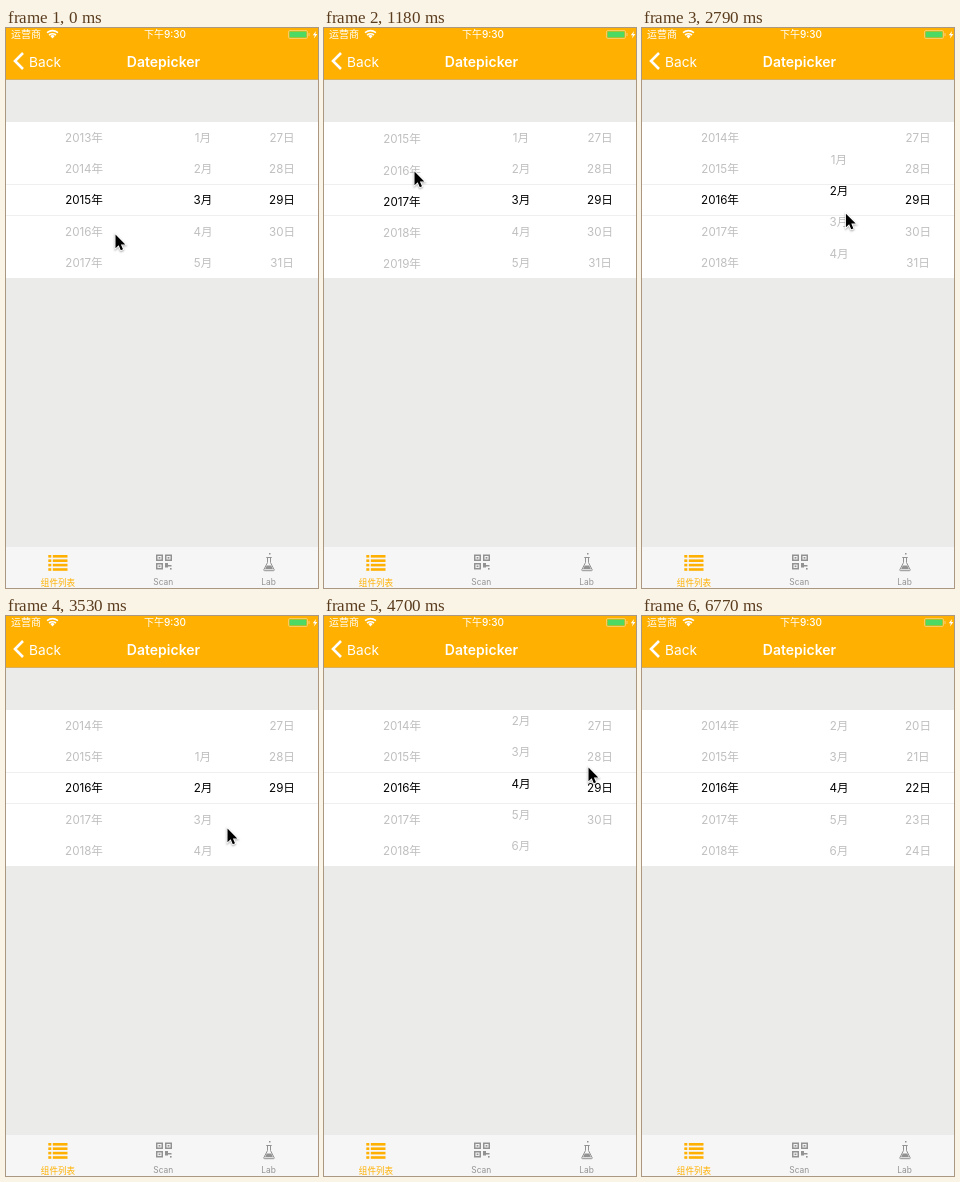
An HTML page with a canvas for the animation above (7.47 s loop, 312 by 560 pixels).

```html
<!DOCTYPE html>
<html lang="zh">
<head>
<meta charset="utf-8">
<title>Datepicker</title>
<style>
  html, body { margin: 0; width: 100%; height: 100%; overflow: hidden; background: #ebebea; }
  canvas { display: block; width: 312px; height: 560px; }
</style>
</head>
<body>
<canvas id="stage"></canvas>
<script>
const LOOP = 7470, STEP = 147.1, LAST_STEP = 46;
const ROW = 31.2, MIDDLE = 172;
const AMBER = '#ffb000', GRAY = '#929292';
const FONT = 'Inter, "Noto Sans CJK SC", "Noto Sans CJK", sans-serif';

const canvas = document.getElementById('stage');
const ctx = canvas.getContext('2d');
const ratio = window.devicePixelRatio || 1;
canvas.width = 312 * ratio;
canvas.height = 560 * ratio;
ctx.scale(ratio, ratio);

const glide = p => p * p * (3 - 2 * p);
// Runs a little past the goal, then springs back, like a flicked wheel.
const flick = p => 1 + 2.7 * (p - 1) ** 3 + 1.7 * (p - 1) ** 2;

// Plays moves of the form { from, to, goal } one after another and rests between them.
function play(start, moves, ease, step) {
  return moves.reduce((value, { from, to, goal }) => {
    const part = ease(Math.min(1, Math.max(0, (step - from) / (to - from))));
    return value.map((v, i) => v + (goal[i] - v) * part);
  }, start);
}

const pointerMoves = [
  { from: 0, to: 2, goal: [94, 199] },
  { from: 4, to: 8, goal: [90, 143] },
  { from: 8, to: 11, goal: [97, 190] },
  { from: 11, to: 14, goal: [162, 192] },
  { from: 14, to: 18, goal: [202, 183] },
  { from: 18, to: 24, goal: [221, 212] },
  { from: 24, to: 28, goal: [200, 207] },
  { from: 28, to: 32, goal: [264, 151] },
  { from: 33, to: 35, goal: [257, 293] },
  { from: 36, to: 39, goal: [267, 178] },
  { from: 40, to: 46, goal: [270, 570] }
];

const wheels = [
  { unit: '年', x: 78, start: 2015, min: 2000, max: () => 2030, moves: [
    { from: 4, to: 8, goal: [2016.95] }, { from: 8, to: 15, goal: [2016] }] },
  { unit: '月', x: 197, start: 3, min: 1, max: () => 12, moves: [
    { from: 18, to: 23, goal: [2] }, { from: 27, to: 34, goal: [4] }] },
  { unit: '日', x: 276, start: 29, min: 1, max: step => step < 22 ? 31 : step < 31 ? 29 : 30, moves: [
    { from: 33, to: 39, goal: [24] }, { from: 40, to: 46, goal: [22] }] }
];

function rect(color, x, y, w, h) {
  ctx.fillStyle = color;
  ctx.fillRect(x, y, w, h);
}

function text(string, x, y, size, color, weight = 400, align = 'center') {
  ctx.font = `${weight} ${size}px ${FONT}`;
  ctx.textAlign = align;
  ctx.fillStyle = color;
  ctx.fillText(string, x, y);
}

function stroke(path, color, width) {
  ctx.strokeStyle = color;
  ctx.lineWidth = width;
  ctx.stroke(new Path2D(path));
}

function fill(path, color) {
  ctx.fillStyle = color;
  ctx.fill(new Path2D(path));
}

function drawHeader() {
  rect(AMBER, 0, 0, 312, 51);
  rect('#d8b060', 0, 51, 312, 1);
  text('运营商', 5, 10.2, 10, '#fff', 400, 'left');
  text('下午9:30', 159, 10.2, 10, '#fff', 500);

  stroke('M41 4.6Q46.5 0.6 52 4.6M43 7Q46.5 4.4 50 7', '#fff', 1.6);
  fill('M46.5 10.6L44.3 8Q46.5 6.2 48.7 8Z', '#fff');

  stroke('M284 2.5H300Q301.5 2.5 301.5 4V9Q301.5 10.5 300 10.5H284Q282.5 10.5 282.5 9V4Q282.5 2.5 284 2.5Z', '#f8d27c', 0.8);
  rect('#4cd964', 283.5, 3.5, 17, 6);
  rect('#f8d27c', 302.5, 5, 1, 3);
  fill('M310 3L306.8 7.2H308.8L308 10.6L311.4 6H309.3Z', '#fff');

  stroke('M17 25L9 33L17 41', '#fff', 2.6);
  text('Back', 23, 38.5, 13.7, '#fff', 400, 'left');
  text('Datepicker', 157.5, 38.5, 14, '#fff', 600);
}

function drawTabs() {
  rect('#f6f6f6', 0, 518, 312, 42);
  rect('#dedede', 0, 518, 312, 0.5);

  for (let y = 527; y < 542; y += 4.4) {
    rect(AMBER, 42.3, y, 3, 2.6);
    rect(AMBER, 46.8, y, 14.7, 2.6);
  }

  for (const [x, y] of [[150, 526.5], [159, 526.5], [150, 535]]) {
    stroke(`M${x + 0.75} ${y + 0.75}h5.5v5h-5.5z`, GRAY, 1.5);
    rect(GRAY, x + 2.6, y + 2.5, 1.8, 1.6);
  }
  fill('M159 535h3v2h3.5v1.5h-3.5v1h-3z', GRAY);
  rect(GRAY, 164, 540, 1.6, 1.6);

  stroke('M260.3 529.5H265.7M261.5 529.5V534.5L257.8 541.8Q257.6 542.7 258.6 542.7H267.4Q268.4 542.7 268.2 541.8L264.5 534.5V529.5', GRAY, 1);
  fill('M260.8 537.5H265.2L267 541.3H259Z', GRAY);
  rect(GRAY, 263, 525, 1.5, 1.5);

  text('组件列表', 52, 557.5, 8.6, AMBER);
  text('Scan', 157.3, 557.4, 8.4, GRAY);
  text('Lab', 262.5, 557.4, 8.4, GRAY);
}

function drawWheel({ unit, x, start, min, max, moves }, step) {
  const [value] = play([start], moves, flick, step);
  const selected = Math.round(value);
  const last = Math.min(max(step), selected + 3);
  for (let n = Math.max(min, selected - 3); n <= last; n++) {
    const y = MIDDLE + (n - value) * ROW + 4.3;
    text(n + unit, x, y, 11.6, n === selected ? '#000' : '#bfbfbf');
  }
}

function drawPicker(step) {
  rect('#fff', 0, 94, 312, 156);
  rect('#efefef', 0, 156, 312, 1);
  rect('#efefef', 0, 187, 312, 1);
  ctx.save();
  ctx.beginPath();
  ctx.rect(0, 94, 312, 156);
  ctx.clip();
  wheels.forEach(wheel => drawWheel(wheel, step));
  ctx.restore();
}

function drawPointer(step) {
  const arrow = 'M0.5 0.5V14.2L3.7 11.2L5.8 16.2L8 15.3L5.9 10.4H10.3Z';
  ctx.save();
  ctx.translate(...play([109, 206], pointerMoves, glide, step));
  ctx.shadowColor = 'rgba(0,0,0,.35)';
  ctx.shadowBlur = 2 * ratio;
  ctx.shadowOffsetY = ratio;
  stroke(arrow, '#fff', 1.8);
  ctx.shadowColor = 'transparent';
  fill(arrow, '#000');
  ctx.restore();
}

function draw(now) {
  // The small lead absorbs rounding, so each step begins on its own tick.
  const step = Math.min(LAST_STEP, Math.floor((now % LOOP + 10) / STEP));
  rect('#ebebea', 0, 0, 312, 560);
  drawHeader();
  drawPicker(step);
  drawTabs();
  drawPointer(step);
  requestAnimationFrame(draw);
}
requestAnimationFrame(draw);
</script>
</body>
</html>
```
